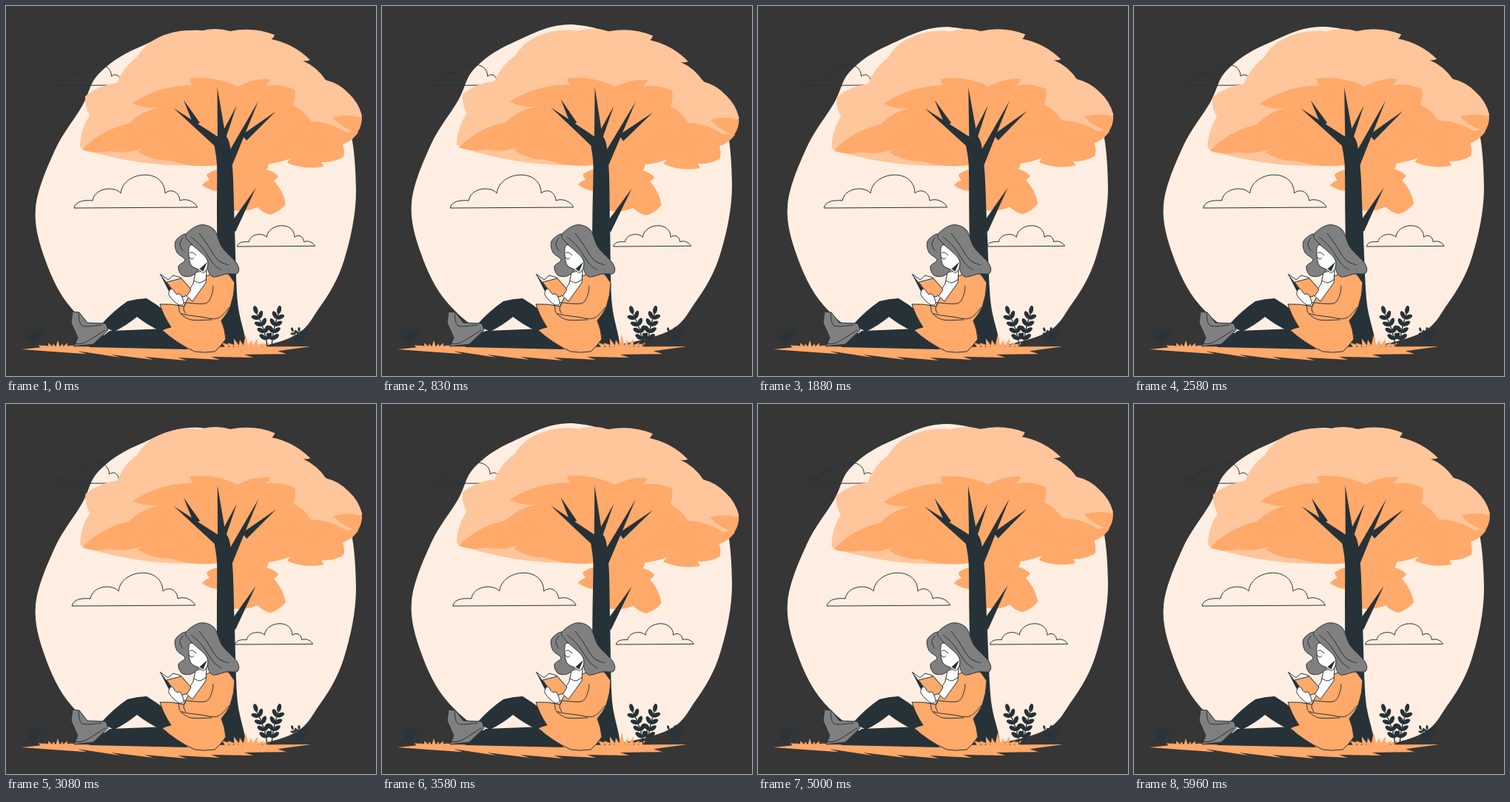
These frames come from a looping animation (500 by 500 pixels, 6 s). An HTML page with a canvas:

```html
<!DOCTYPE html>
<html lang="en">
<head>
<meta charset="utf-8">
<title>Reading under a tree</title>
<style>
html, body { margin: 0; width: 100%; height: 100%; overflow: hidden; background: #363636; }
canvas { display: block; width: 100vmin; height: 100vmin; }
</style>
</head>
<body>
<canvas id="stage" width="500" height="500"></canvas>
<script>
const ctx = document.getElementById('stage').getContext('2d');
const INK = '#263238', DIM = '#2a343b', CREAM = '#ffeee1', PEACH = '#ffc59b';
const ORANGE = '#ffa96a', GRAY = '#808080', WHITE = '#fff';
const LOOP = 6000;

function paint(path, fill, stroke) {
  if (fill) { ctx.fillStyle = fill; ctx.fill(path); }
  if (stroke) { ctx.strokeStyle = stroke; ctx.lineWidth = 1; ctx.stroke(path); }
}

// Smooth curve through x,y pairs
function curve(p, closed = true) {
  const n = p.length / 2, path = new Path2D();
  const at = i => {
    i = closed ? (i + n) % n : Math.max(0, Math.min(n - 1, i));
    return [p[2 * i], p[2 * i + 1]];
  };
  path.moveTo(p[0], p[1]);
  for (let i = 0; i < (closed ? n : n - 1); i++) {
    const [a, b, c, d] = [at(i - 1), at(i), at(i + 1), at(i + 2)];
    path.bezierCurveTo(b[0] + (c[0] - a[0]) / 6, b[1] + (c[1] - a[1]) / 6,
      c[0] - (d[0] - b[0]) / 6, c[1] - (d[1] - b[1]) / 6, c[0], c[1]);
  }
  if (closed) path.closePath();
  return path;
}

// Clockwise outline whose sides bulge outwards, as leaves do
function lobes(p, bulge = 0) {
  const path = new Path2D(), n = p.length;
  path.moveTo(p[0], p[1]);
  for (let i = 0; i < n; i += 2) {
    const x = p[i], y = p[i + 1], u = p[(i + 2) % n], v = p[(i + 3) % n];
    path.quadraticCurveTo((x + u) / 2 + (v - y) * bulge, (y + v) / 2 - (u - x) * bulge, u, v);
  }
  path.closePath();
  return path;
}
const poly = p => lobes(p);

const blob = curve([262,33, 177,57, 125,92, 103,135, 66,195, 40,273, 53,343, 88,408,
  150,453, 260,471, 380,450, 424,407, 457,343, 473,248, 455,138, 385,74]);

const crown = lobes([100,190, 113,148, 107,122, 150,104, 177,69, 205,43, 262,34, 303,34, 363,39, 359,45,
  411,73, 401,74, 432,100, 463,118, 481,148, 468,180, 380,195, 112,196], .15);
const shade = lobes([103,194, 166,159, 208,137, 171,131, 252,107, 248,98, 313,109, 357,99, 350,108, 390,113,
  388,134, 412,156, 460,171, 476,171, 455,187, 456,204, 426,211, 429,217, 380,212, 385,206,
  306,211, 222,209, 178,197, 187,191, 140,196], .15);
const swirl = lobes([442,151, 481,151, 475,171], .15);
const tuft = lobes([286,221, 306,205, 355,214, 352,221, 368,230, 362,236, 378,268, 357,282, 340,272,
  306,276, 286,250, 265,242, 275,235, 271,228], .15);

// All clouds share one outline
const puff = new Path2D('M0 0C2 -9 12 -11 25 -10C28 -28 55 -30 63 -20' +
  'C66 -50 122 -56 123 -20C131 -27 142 -22 143 -10C152 -14 164 -8 166.5 -1Z');

function cloud(x, y, size) {
  const path = new Path2D();
  path.addPath(puff, new DOMMatrix([size, 0, 0, size, x, y]));
  paint(path, null, INK);
}

// Tapering limb from a wide foot to a sharp tip
function limb(x, y, tipX, tipY, width, color) {
  const len = Math.hypot(tipX - x, tipY - y);
  const nx = (tipY - y) / len * width / 2, ny = (x - tipX) / len * width / 2;
  paint(poly([x + nx, y + ny, tipX, tipY, x - nx, y - ny]), color);
}

function tree() {
  paint(crown, PEACH);
  [shade, swirl, tuft].forEach(p => paint(p, ORANGE));
  paint(curve([282,466, 285,380, 285,280, 285,215, 282,181, 299,178, 306,218, 309,300, 313,400, 323,464]), INK);
  limb(291, 188, 226.5, 138, 14, INK);
  limb(258, 160, 240, 127, 9, INK);
  limb(293, 195, 285.5, 110, 14, INK);
  limb(293, 178, 311.5, 135, 8, INK);
  limb(300, 212, 341, 128.5, 13, INK);
  limb(322, 178, 364.5, 142.5, 10, INK);
  limb(305, 302, 337.5, 246, 12, INK);
}

function grass(x, y, spread, height, blades) {
  for (let i = 0; i < blades; i++) {
    const s = i / (blades - 1) * 2 - 1;
    const h = height * (1 - .65 * Math.abs(s)) * (i % 2 ? .7 : 1);
    limb(x + s * spread * .75, y, x + s * spread, y - h, spread / blades * 2.2, ORANGE);
  }
}

function ground() {
  const edge = [21, 464, 60, 460, 250, 461, 412, 460];
  for (let i = 1; i < 8; i++) {
    const x = 412 - i * 45, y = 463 + 14 * Math.sin(i * Math.PI / 8);
    edge.push(x, y - 2, x + 12, y + 2);
  }
  paint(poly(edge), ORANGE);
  grass(70, 462, 26, 10, 9);
  grass(324, 461, 32, 17, 9);
}

// A bent stem with pairs of leaves and one at the tip
function sprig(x, y, dx, dy, pairs, size, color) {
  const leaf = (px, py, angle) => {
    ctx.beginPath();
    ctx.ellipse(px + Math.cos(angle) * size, py + Math.sin(angle) * size, size, size * .52, angle, 0, 7);
    ctx.fill();
  };
  ctx.fillStyle = ctx.strokeStyle = color;
  ctx.lineWidth = size / 4;
  ctx.beginPath();
  ctx.moveTo(x, y);
  ctx.quadraticCurveTo(x + dx * .15, y + dy * .5, x + dx, y + dy);
  ctx.stroke();
  for (let i = 1; i <= pairs; i++) {
    const s = i / (pairs + .7);
    const px = x + dx * (.3 * s * (1 - s) + s * s), py = y + dy * s;
    const tilt = Math.atan2(dy, dx * 2 * s);
    leaf(px, py, tilt - .8);
    leaf(px, py, tilt + .8);
  }
  leaf(x + dx, y + dy, Math.atan2(dy, dx));
}

function plants() {
  for (const x of [37, 396]) {
    for (const lean of [-8, 0, 9]) sprig(x, 459, lean, -19, 3, 3, DIM);
  }
  sprig(353, 460, -14, -44, 4, 5.6, INK);
  sprig(359, 460, 9, -44, 4, 5.6, INK);
}

const line = (...p) => paint(curve(p, false), null, INK);

function legs() {
  paint(lobes([129,430, 164,399, 190,395, 235,430, 208,439, 177,420, 146,440], .06), INK);
  paint(poly([112,461, 140,439, 216,436, 246,464]), INK);
  paint(poly([90,413, 99,414, 110,428, 135,429, 138,438, 118,457, 92,460, 97,448, 88,428]), GRAY, INK);
  line(98,415, 103,432, 129,431);
  line(91,456, 106,455, 134,438);
}

function coat() {
  paint(lobes([268,366, 296,358, 309,374, 303,407, 291,425, 297,450, 282,467, 255,467,
    211,438, 223,434, 208,403, 240,406], .08), ORANGE, INK);
  paint(poly([256,360, 271,357, 270,374, 252,399, 243,391, 253,375]), WHITE, INK);
  line(254,371, 262,374, 271,369);
  line(280,378, 278,390, 269,402, 237,401, 234,409, 238,416, 263,420, 286,422, 302,407);
  line(243,402, 240,409, 243,416);
  line(236,416, 250,424, 278,424);
}

function book() {
  paint(poly([208,362, 219,370, 226,364, 236,367, 247,380, 224,385]), WHITE, INK);
  limb(222, 384, 208, 362, 5, INK);
  paint(poly([217,373, 237,368, 250,383, 245,391, 233,395]), ORANGE, INK);
  paint(curve([224,382, 230,389, 236,390, 240,402, 232,403, 220,390]), WHITE, INK);
}

function head() {
  paint(curve([243,308, 229,318, 231,333, 242,343, 233,352, 238,364, 252,364, 262,350, 254,318]), GRAY, INK);
  paint(curve([248,324, 262,329, 273,346, 268,360, 260,356, 249,348]), WHITE, INK);
  line(247,339, 251,342, 254,340);
  line(248,334, 252,333, 257,337);
  limb(264, 357, 272, 346, 6, INK);
  paint(curve([243,309, 262,296, 281,302, 292,326, 312,348, 313,361, 298,362, 280,366,
    273,357, 271,341, 250,321]), GRAY, INK);
  line(261,307, 272,322, 286,343, 301,350);
  line(250,312, 264,325, 280,348, 291,357);
  line(239,313, 235,322, 239,331);
}

// Linear interpolation over [position, value] stops
function tween(stops, u) {
  const i = Math.max(1, stops.findIndex(s => s[0] >= u));
  const [a, v] = stops[i - 1], [b, w] = stops[i];
  return v + (w - v) * (u - a) / (b - a);
}
const SHAKE = [0, -1, 2, -4, 4, -4, 4, -4, 2, -1, 0].map((v, i) => [i / 10, v]);
const WIND = [[0, 0], [.25, 1], [.75, -1], [1, 0]];
const FLOAT = [[0, 0], [.5, -8.5], [1, 0]];
const phase = (t, period) => t % period / period;

function moved(dx, dy, degrees, draw) {
  ctx.save();
  ctx.translate(290 + dx, 245 + dy);
  ctx.rotate(degrees * Math.PI / 180);
  ctx.translate(-290, -245);
  draw();
  ctx.restore();
}

function draw(t) {
  ctx.lineJoin = 'round';
  ctx.fillStyle = '#363636';
  ctx.fillRect(0, 0, 500, 500);
  moved(0, tween(FLOAT, phase(t, 1500)), 0, () => paint(blob, CREAM));
  moved(tween(SHAKE, phase(t, LOOP)), 0, 0, () => {
    cloud(92, 273, 1);
    cloud(312.5, 325, .63);
    cloud(65, 107.5, .63);
  });
  moved(0, 0, tween(WIND, phase(t, 3000)), tree);
  ground();
  plants();
  legs();
  coat();
  book();
  head();
}

const start = performance.now();
function frame() {
  draw((performance.now() - start) % LOOP);
  requestAnimationFrame(frame);
}
frame();
</script>
</body>
</html>
```
